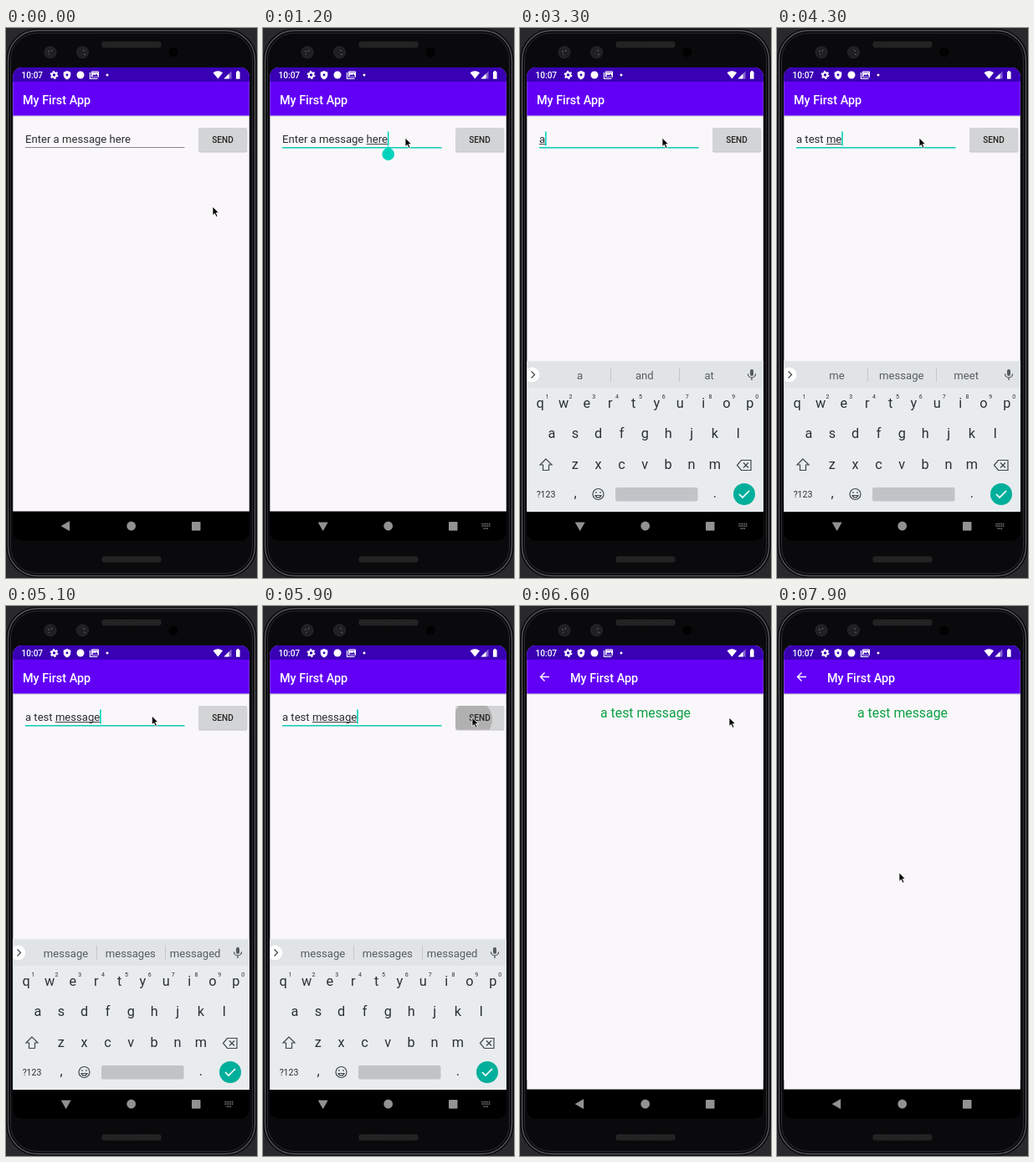
An HTML page for the animation above (8000 ms loop, 300x656 px).

```html
<!DOCTYPE html>
<html lang="en">
<head>
<meta charset="utf-8">
<title>Message app</title>
<style>
html, body { margin: 0; width: 100%; height: 100%; overflow: hidden; background: #29292c; }
svg { display: block; width: 100vw; height: 100vh; }
text { font-family: Roboto, Arial, sans-serif; white-space: pre; }
.med { font-weight: 500; }
.mid { text-anchor: middle; }
.line { fill: none; stroke: #40464a; stroke-width: 1.2; }
</style>
</head>
<body>
<svg viewBox="0 0 300 656">
  <defs>
    <clipPath id="screen"><rect x="8.3" y="47" width="282.5" height="564.500" rx="11"/></clipPath>
    <clipPath id="reveal"><rect id="revealBox" x="0" width="300" height="656"/></clipPath>
    <clipPath id="buttonClip"><rect x="230" y="119" width="58" height="28.5" rx="2"/></clipPath>
    <pattern id="mesh" width="3" height="3" patternUnits="userSpaceOnUse">
      <rect width="3" height="3" fill="#2a2a2b"/><path d="M0 0L3 3M3 0L0 3" stroke="#1a1a1a" stroke-width=".8"/>
    </pattern>
    <g id="window">
      <rect x="8" y="46" width="284" height="530.500" fill="#f9f7fa"/>
      <rect x="8" y="104" width="284" height="2" opacity=".1"/>
      <rect x="8" y="46" width="284" height="58.500" fill="#6200f6"/>
      <rect x="8" y="46" width="284" height="18" fill="#3900b4"/>
    </g>
  </defs>

  <!-- phone body -->
  <rect x=".3" y="1" width="299.400" height="654.500" rx="37" fill="#08080a"/>
  <rect x="2.500" y="3" width="295" height="650.500" rx="35" fill="#09090b" stroke="#56565a" stroke-width="1.400"/>
  <rect x="5.500" y="6" width="289" height="644.500" rx="32" fill="#0a0a0c" stroke="#2c2c30"/>
  <rect x="114.500" y="16" width="71" height="7.500" rx="3" fill="url(#mesh)"/>
  <rect x="114.500" y="630" width="71" height="7.500" rx="3" fill="url(#mesh)"/>
  <g fill="#202023" stroke="#29292c"><circle cx="53" cy="29" r="7"/><circle cx="91.500" cy="29" r="7"/></g>
  <path d="M50 27l2 2m3-3l-1 2m-3 4l1-1M92 26l2 2m-1 3l2 1" stroke="#69696c"/>
  <circle cx="200" cy="29" r="5.500" fill="#010102"/>

  <g clip-path="url(#screen)">
    <rect x="8" y="47" width="284" height="565"/>

    <g id="form">
      <use href="#window"/>
      <text class="med" x="20" y="90.500" font-size="14.400" fill="#fff">My First App</text>
      <text id="field" x="23" y="137" font-size="13.100" fill="#2c2c2e"></text>
      <rect id="compose" y="138" height="1" fill="#444"/>
      <rect id="fieldLine" x="23" width="190.500"/>
      <g id="caret" fill="#03d3bd">
        <rect x="-.800" y="123.500" width="1.600" height="17"/>
        <path id="handle" d="M0 141l5.300 4.600a7.300 7.300 0 1 1-10.600 0z"/>
      </g>
      <rect x="230" y="119.500" width="58.300" height="29" rx="2" opacity=".2"/>
      <g clip-path="url(#buttonClip)">
        <rect x="230" y="119" width="58" height="29" fill="#d3d4d5"/>
        <circle id="ripple" cx="251" cy="135" opacity=".17"/>
      </g>
      <text class="med mid" x="259" y="137" font-size="10.080" fill="#252525">SEND</text>
      <rect id="dim" x="8" y="46" width="284" height="542"/>
    </g>

    <g clip-path="url(#reveal)">
      <g id="result">
        <use href="#window"/>
        <path d="M35 84.500H24.500m5-5l-5 5 5 5" fill="none" stroke="#fff" stroke-width="1.400"/>
        <text class="med" x="60" y="90.500" font-size="14.400" fill="#fff">My First App</text>
        <text class="mid" x="150" y="133" font-size="15.840" fill="#0ca043">a test message</text>
      </g>
    </g>

    <g id="keyboard">
      <rect x="8" y="397.500" width="284" height="179.500" fill="#e8ecef"/>
      <rect x="8" y="397.500" width="284" height="31.500" fill="#e0e4e7"/>
      <circle cx="14.500" cy="413.500" r="8.700" fill="#fff"/>
      <path class="line" d="M13.500 409.500l4 4-4 4" stroke-width="1.500"/>
      <path d="M108.500 405v17M190.500 405v17" stroke="#c3c8cb"/>
      <g id="hints" class="mid" font-size="13.100" fill="#565c60"></g>
      <rect x="275" y="407" width="4" height="8" rx="2" fill="#555b5f"/>
      <path class="line" d="M272.500 412.500a4.500 4.500 0 0 0 9 0M277 417v3"/>
      <g id="keys" class="mid" fill="#2b3034"></g>
      <path class="line" d="M31 514l-7 7h3.500v6.500h7V521H38z"/>
      <path class="line" d="M259.500 521.500l5-6H276v12h-11.500zM267 518.500l6 6m0-6l-6 6"/>
      <circle class="line" cx="93.500" cy="556" r="6.500"/>
      <path class="line" d="M90 557.500a3.700 3.700 0 0 0 7 0zM91 553v2m5-2v2"/>
      <rect x="114" y="548" width="98.500" height="16.500" rx="2" fill="#c0c4c7"/>
      <circle cx="268" cy="556" r="13" fill="#00af9b"/>
      <path d="M262 556l4 4 8-8" fill="none" stroke="#fff" stroke-width="1.700"/>
    </g>

    <g fill="#929292">
      <path id="back" d="M65.600 594l10.500-6v12z"/>
      <g id="imeNav"><path d="M65.700 589.500h12l-6 10.500z"/>
        <path d="M261.500 591.500h9.800M261.500 594h9.800M263.500 597h6" stroke="#929292" stroke-width="1.300" stroke-dasharray="1.200 .950"/></g>
      <circle cx="149.700" cy="594" r="5.400"/>
      <rect x="222" y="589" width="10.500" height="10.500" rx=".8"/>
    </g>

    <g fill="#fff">
      <text class="med" x="18.500" y="60" font-size="10.080">10:07</text>
      <circle cx="57.500" cy="56" r="2.700" fill="none" stroke="#fff" stroke-width="2"/>
      <circle cx="57.500" cy="56" r="4.200" fill="none" stroke="#fff" stroke-width="1.500" stroke-dasharray="2.200 2.198"/>
      <path d="M73 51l4.300 1.700v3q0 4-4.300 5.800-4.300-1.800-4.300-5.800v-3z"/>
      <circle cx="73" cy="56" r="1.400" fill="#3900b4"/>
      <circle cx="89" cy="56" r="4.500"/>
      <path d="M100.500 53v7.500h9" fill="none" stroke="#fff" stroke-width="1.200"/>
      <rect x="102" y="51.500" width="9" height="7.500" rx="1"/>
      <path d="M103 58l2-2.500 1.500 1.500 1.500-2 2 3zM103 53h7" fill="#3900b4" stroke="#3900b4" stroke-width=".6"/>
      <circle cx="121" cy="56" r="1.500"/>
      <path d="M247.500 53.300q5.800-4.300 11.600 0l-5.800 7.200z"/>
      <path d="M269.500 51.500v9h-9z" opacity=".4"/><path d="M266.500 54.500v6h-6z"/>
      <path d="M275 52.300h1.300V51h2v1.300h1.300v8.400H275z"/>
    </g>
  </g>

  <path id="pointer" d="M0 0V10.500L2.400 8.300 4.200 12.300 6 11.500 4.200 7.500H7.400z" stroke="#fff" stroke-width=".8"/>
</svg>
<script>
const $ = id => document.getElementById(id);
const set = (id, attrs) => { for (const k in attrs) $(id).setAttribute(k, attrs[k]); };
const show = (id, on) => { $(id).style.display = on ? "" : "none"; };
const clamp = v => Math.max(0, Math.min(1, v));
const label = (s, x, y, size) => `<text x="${x}" y="${y}"${size ? ` font-size="${size}"` : ""}>${s}</text>`;

const row = (letters, x, y) =>
  [...letters].map((c, i) => label(c, x + 27.85 * i, y, 16.3)).join("");
$("keys").innerHTML = row("qwertyuiop", 24.2, 453) + row("asdfghjkl", 38, 489) +
  row("zxcvbnm", 65.7, 525.5) + row(",", 66, 560) + row(".", 233, 560) + label("?123", 31, 560, 10.5) +
  [..."1234567890"].map((c, i) => label(c, 32.5 + 27.85 * i, 441.5, 7)).join("");

const before = "Enter a message here", after = "a test message";
const guesses = {
  a: "a and at", t: "the to that", te: "tell text tea", tes: "test tests tea", test: "test tests tested",
  m: "m me my", me: "me message meet", mes: "mes message mess"
};

function textAt(t) {
  if (t < 1700) return before;
  if (t <= 2200) return before.slice(0, 20 - Math.floor((t - 1600) / 150));
  if (t < 3300) return before.slice(0, Math.max(0, 16 - (t - 2200) / 50));
  return after.slice(0, Math.floor(1 + (t - 3300) / 125));
}

function hintsAt(t, text) {
  if (t < 3300) return "here her he";
  const word = text.trim().split(" ").pop();
  return guesses[word] || "message messages messaged";
}

const path = [ // time, x, y
  [0, 247, 213], [100, 247, 213], [600, 170, 131], [5000, 170, 131], [5700, 250, 133], [7100, 250, 133],
  [7300, 178, 28], [7400, 178, -20], [7600, 103, -20], [7700, 103, 0], [7900, 146, 318], [8000, 146, 318]
];
function pointerAt(t) {
  const i = path.findIndex(p => p[0] > t);
  const [t0, x0, y0] = path[i - 1], [t1, x1, y1] = path[i];
  const u = (t - t0) / (t1 - t0), e = u * u * (3 - 2 * u);
  return [x0 + (x1 - x0) * e, y0 + (y1 - y0) * e];
}

const ctx = document.createElement("canvas").getContext("2d");
const width = s => { ctx.font = "13.1px Roboto, Arial, sans-serif"; return ctx.measureText(s).width; };

function draw(t) {
  const focused = t >= 800, text = textAt(t);
  const start = text.lastIndexOf(" ") + 1;
  const end = 23 + width(text), from = 23 + width(text.slice(0, start));
  $("field").textContent = text;
  set("compose", { x: from, width: focused ? end - from : 0 });
  set("fieldLine", focused ? { y: 142, height: 1.5, fill: "#0bcab6" } : { y: 142, height: 1, fill: "#858587" });
  set("caret", { transform: `translate(${end + .7})` });
  show("caret", focused);
  show("handle", t >= 900 && t < 1700);
  set("ripple", { r: t < 5800 ? 0 : 8 + (t - 5800) * .15 });

  // the result window rises and unrolls over the form
  const rest = (1 - clamp((t - 6160) / 425)) ** 2, lift = 22.5 * rest;
  set("form", { transform: `translate(0 ${-11 * (1 - rest)})` });
  set("dim", { opacity: .17 * (1 - rest) });
  set("result", { transform: `translate(0 ${lift})` });
  set("revealBox", { y: 47 + lift + 563 * rest ** 2.96 });
  show("result", rest < 1);

  const kb = clamp(Math.min((t - 1200) / 250, 1 - (t - 6150) / 400));
  set("keyboard", { transform: `translate(0 ${54 * (1 - kb)})`, opacity: kb });
  $("hints").innerHTML = hintsAt(t, text).split(" ").map((s, i) => label(s, 71.5 + 77.3 * i, 418.5)).join("");

  const ime = t >= 1100 && t < 6200;
  show("imeNav", ime);
  show("back", !ime);
  set("pointer", { transform: `translate(${pointerAt(t)})` });
}

function tick() {
  draw(Math.floor(performance.now() % 8000 / 100) * 100);
  requestAnimationFrame(tick);
}
tick();
</script>
</body>
</html>
```
